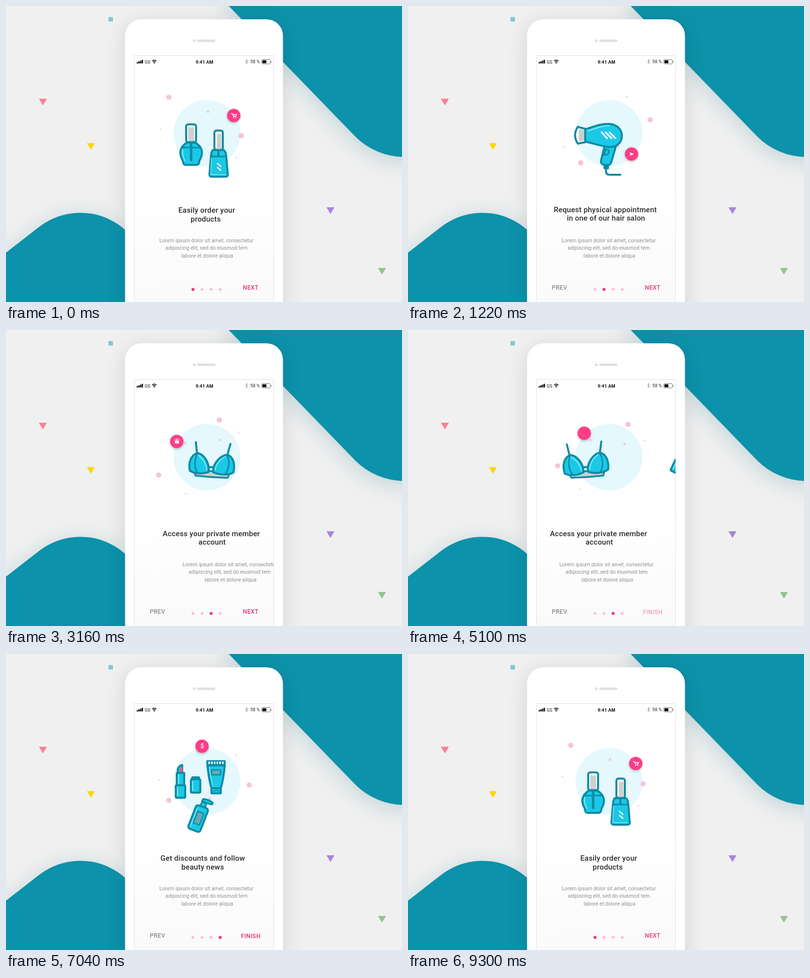
Animation of 800x600 px, one loop 9.74 s. Source, as an HTML page with a canvas:

```html
<!DOCTYPE html>
<html lang="en">
<head>
<meta charset="utf-8">
<title>Beauty app onboarding</title>
<style>
html, body { margin: 0; width: 100%; height: 100%; overflow: hidden; background: #f0f0f0; }
canvas { display: block; width: 800px; height: 600px; }
</style>
</head>
<body>
<canvas id="stage" width="800" height="600"></canvas>
<script>
const LOOP = 9740, SLIDE = 300;
const TEAL = '#0c92aa', LINE = '#0d8ca3', CYAN = '#1ac9e6', PALE = '#8ce8f5', PINK = '#fc3d88', GREY = '#cfcfcf';
const FONT = 'Roboto, sans-serif';
const stage = document.getElementById('stage').getContext('2d');
let c = stage;

// ---------- timing ----------
const starts = [20, 1976, 4559, 7716];
const spans = [1300, 1740, 1740, 1740];
const clamp = v => Math.max(0, Math.min(1, v));
const ramp = (t, a, b) => clamp((t - a) / (b - a));
const ease = p => p < .5 ? 16 * p ** 5 : 1 - 16 * (1 - p) ** 5;

function progress(i, t, delay = 0) {
  const d = delay * spans[i] / 1740;
  return ease(clamp((t - starts[i] - d) / spans[i]));
}

// Sums the eased steps between consecutive values.
const follow = (values, delays, t) => delays.reduce(
  (v, d, i) => v + (values[i + 1] - values[i]) * progress(i, t, d), values[0]);

// Returns how far a part is still to come in (0..1) and how far it has left (0..1).
function travel(scene, t, inDelay, outDelay) {
  if (scene === 0 && t > 6500) return [1 - progress(3, t, inDelay), 0];
  const coming = scene ? 1 - progress(scene - 1, t, inDelay) : 0;
  return [coming, progress(scene, t, outDelay)];
}

// ---------- drawing helpers ----------
function fill(path, color) {
  c.fillStyle = color;
  c.fill(new Path2D(path));
}
function line(path, width = 4, color = LINE) {
  c.strokeStyle = color;
  c.lineWidth = width;
  c.stroke(new Path2D(path));
}
function shape(path, color = CYAN, width = 4) {
  fill(path, color);
  line(path, width);
}
function disc(x, y, r, color) {
  c.fillStyle = color;
  c.beginPath();
  c.arc(x, y, r, 0, Math.PI * 2);
  c.fill();
}
function box(x, y, w, h, r, color, width) {
  c.beginPath();
  c.roundRect(x, y, w, h, r);
  c.fillStyle = color;
  c.fill();
  if (width) {
    c.strokeStyle = LINE;
    c.lineWidth = width;
    c.stroke();
  }
}
function text(str, x, y, font, color, spacing = 0, align = 'center') {
  c.font = font + ' ' + FONT;
  c.letterSpacing = spacing + 'px';
  c.textAlign = align;
  c.fillStyle = color;
  c.fillText(str, x, y);
}

// ---------- illustrations ----------
function roundPolish() {
  shape('M365 277C350 287 349 300 357 313Q358 322 362 322H386Q390 322 391 313C399 300 398 287 383 277Z');
  line('M357 291Q355 301 361 313', 2, PALE);
  line('M355 287H393', 3);
  line('M374 278V312', 5);
  box(364, 240, 20, 36, 4, '#fff', 4);
  box(368, 246, 12, 28, 0, GREY);
}
function tallPolish() {
  shape('M418 292Q415 294 414 305L411 341Q411 346 415 346H444Q448 346 448 341L445 305Q444 294 440 292Z');
  line('M415 309L413.500 342H443', 1.500, PALE);
  line('M415 305H444', 3);
  line('M429 293V304', 4);
  box(421, 252.500, 17, 39, 4, '#fff', 4);
  box(426, 259, 9, 31, 0, GREY);
  line('M427 319L434 325M427 327L434 333', 2.500, '#fff');
}
function dryer() {
  line('M400 329V335Q400 342 407 342H429', 4);
  shape('M397 284L390 313Q389 322 398 322H406Q410 321 412 312L421 281Z');
  shape('M399 291Q407 290 406 296Q405 302 396 302Z', CYAN, 3);
  box(396, 322, 9, 8, 1, LINE, 2);
  shape('M358 250C374 245 388 238 407 239C422 240 432 250 432 263C432 277 423 285 408 286C390 285 375 278 358 275Z');
  line('M363 253C380 248 391 243 407 243', 2, PALE);
  shape('M343 245L358 249V276L343 279Q332 262 343 245Z', '#fff', 4);
  fill('M345 249L356 252V273L345 275Z', GREY);
  line('M391 256L402 268M399 256L411 268M407 256L419 268', 3.500, '#fff');
}
function bra() {
  line('M373 228L376 252M443 230L437 253', 4);
  shape('M370 287L374 296Q406 299 439 299L442 290Q406 284 370 287Z', GREY, 3.500);
  line('M398 278H412', 4);
  const cup = 'M362 286C358 268 365 253 377 250C390 252 402 269 400 288C388 293 371 292 362 286Z';
  const cup2 = 'M450 288C454 270 449 256 437 252C423 254 408 270 409 288C421 294 440 294 450 288Z';
  shape(cup);
  shape(cup2);
  line('M378 254C388 261 395 271 396 284M433 256C421 262 414 274 413 284', 2, PALE);
  line('M377 251C370 264 371 279 377 289M437 253C443 266 441 281 434 291', 3);
}
function lipstick() {
  shape('M347 242V233Q350 226 356 225V242Z', CYAN, 4);
  fill('M351 242V235Q353 230 357 229V242Z', '#f2538f');
  box(345, 241, 15, 26, 1, CYAN, 4);
  line('M348.500 245V264', 2, PALE);
  box(343, 266, 19, 25.500, 2, CYAN, 4);
  line('M346.500 270V287', 2, PALE);
}
function lipstickCap() {
  box(376, 250, 14, 6, 1, CYAN, 4);
  box(373.500, 254, 19, 27, 2, CYAN, 4);
  line('M377 258V277', 2, PALE);
}
function tube() {
  shape('M407 225Q409 251 415 272H434Q440 251 442 225Z');
  box(415, 272, 19, 10.500, 1, CYAN, 4);
  line('M419 279Q424.500 273 430 279', 2);
  box(406.500, 217, 35.500, 9, 0, LINE, 3.500);
  for (let i = 0; i < 6; i++) box(409 + i * 5.500, 218, 3, 5, 0, '#fff');
  line('M411 230Q413 250 418 268', 1.500, PALE);
  box(415.500, 235, 18, 10, 0, '#69a8b3', 2.500);
}
function bottle() {
  c.save();
  c.translate(388, 334);
  c.rotate(.366);
  box(-5, -35, 10, 9, 1, CYAN, 3);
  shape('M-5 -41Q4 -45 16 -41V-37L5 -36H-5Z', CYAN, 3.500);
  box(-13, -26, 26, 51, 5, CYAN, 4);
  line('M-9 -19V20', 1.500, PALE);
  box(-6, -14, 13, 25, 0, '#69a8b3', 2.500);
  c.restore();
}

// ---------- badge icons ----------
function cartIcon() {
  line('M-5 -4H-3L0 2H4L6 -2H-2', 1.500, '#fff');
  disc(-.500, 4.300, 1, '#fff');
  disc(4, 4.300, 1, '#fff');
}
const planeIcon = () => fill('M-4 -3.500L5 0L-4 3.500L-2 0Z', '#fff');
function crownIcon() {
  line('M-3 1L-5.500 -3M-1.500 0L-2.500 -5M0 0V-5.500M1.500 0L2.500 -5M3 1L5.500 -3', 1, '#fff');
  fill('M-4 0H4V5H-4Z', '#fff');
  disc(0, 2.500, 1, PINK);
}
const dollarIcon = () => text('$', .500, 4.300, '500 12px', '#fff');

// Each part: draw, centre x, centre y, in delay, out delay, tilt on leaving.
const scenes = [
  { title: ['Easily order your', 'products'], x: [405.5, 403.5], y: 419, icon: cartIcon,
    parts: [[roundPolish, 374, 281, -60, -120, -35], [tallPolish, 429, 300, 0, 0, 35]] },
  { title: ['Request physical appointment', 'in one of our hair salon'], x: [398.5, 400], y: 417.5, icon: planeIcon,
    parts: [[dryer, 384, 290, 0, -130, -35]] },
  { title: ['Access your private member', 'account'], x: [399, 400.5], y: 417.5, icon: crownIcon,
    parts: [[bra, 406, 264, -51, -151, -42]] },
  { title: ['Get discounts and follow', 'beauty news'], x: [397.5, 397.5], y: 419, icon: dollarIcon,
    parts: [[lipstick, 352, 259, -260, -127, 40], [lipstickCap, 383, 266, -90, 33, 45],
            [tube, 424, 249, 120, 266, 0], [bottle, 388, 327, 0, 97, 0]] }
];
const copy = ['Lorem ipsum dolor sit amet, consectetur', 'adipiscing elit, sed do eiusmod tem', 'labore et dolore aliqua'];

// Offset from the pivot and radius of each drifting dot.
const specks = [[-67, -69, 5.3], [79, 9, 5.3], [12, -40, 2.6], [41, 23.5, 2.4], [-84, -5, 1.5], [68, 54, 1.5]];

// ---------- static backdrop ----------
function shadow(color, blur, y = 0) {
  c.shadowColor = color;
  c.shadowBlur = blur;
  c.shadowOffsetY = y;
}
function triangle(x, y, color) {
  fill(`M${x - 8} ${y - 6.5}H${x + 8}L${x} ${y + 7}Z`, color);
}
function statusBar() {
  for (let i = 0; i < 4; i++) box(264 + i * 3.400, 113.500 - i * 1.500, 2.600, 3 + i * 1.500, .5, '#111');
  text('GS', 280, 116.500, '9px', '#222', 0, 'left');
  line('M295 111.500Q299.500 107.500 304 111.500M296.800 113.500Q299.500 111 302.200 113.500', 1.500, '#111');
  disc(299.5, 115.3, 1.2, '#111');
  text('9:41 AM', 401, 116.500, 'bold 9px', '#111', .2);
  line('M483.500 110.500L488.500 115L486 117.500V108L488.500 110.500L483.500 115', .8, '#888');
  text('58 %', 493.500, 116.300, '9px', '#222', .1, 'left');
  c.beginPath();
  c.roundRect(516.5, 108.5, 17.5, 9, 2);
  c.strokeStyle = '#777';
  c.lineWidth = 1;
  c.stroke();
  box(518, 110, 8, 6, .5, '#111');
  box(535, 111.500, 1.300, 3, .5, '#777');
}
function makeBackdrop() {
  const cv = document.createElement('canvas');
  cv.width = 800;
  cv.height = 600;
  c = cv.getContext('2d');
  c.fillStyle = '#f0f0f0';
  c.fillRect(0, 0, 800, 600);
  shadow('rgba(12,110,130,.22)', 46, 8);
  fill('M450 0L706 265A140 140 0 0 0 805 306H860V-60H450Z', TEAL);
  fill('M-40 531L0 500L64 450A135.800 135.800 0 0 1 286 555V660H-40Z', TEAL);
  shadow('transparent', 0);
  box(207, 22.500, 9, 9, 0, '#82c6d2');
  triangle(74.5, 194.5, '#fb7f95');
  triangle(171.5, 284.5, '#ffd500');
  triangle(655.5, 414.5, '#a882dd');
  triangle(759.5, 537.5, '#90c490');
  shadow('rgba(0,20,30,.13)', 42, 8);
  box(240.500, 27, 319, 640, 33, '#fff');
  shadow('transparent', 0);
  disc(380.300, 70.500, 3, '#e0e0e0');
  box(386, 68, 37, 5, 2.500, '#e0e0e0');
  const g = c.createLinearGradient(0, 370, 0, 600);
  g.addColorStop(0, '#fff');
  g.addColorStop(1, '#f9faf9');
  c.fillStyle = g;
  c.fillRect(260, 101, 281, 499);
  c.strokeStyle = '#e1e1e1';
  c.lineWidth = 1;
  c.strokeRect(259.5, 100.5, 281, 520);
  statusBar();
  disc(406, 258, 67.5, '#e4f8fe');
  c = stage;
  return cv;
}

// ---------- moving layers ----------
function drawSpecks(t) {
  const turn = follow([0, 120, 293, 501, 720], [-20, -99, 16, -131], t) * Math.PI / 180;
  const cos = Math.cos(turn), sin = Math.sin(turn);
  for (const [x, y, r] of specks) disc(396 + x * cos - y * sin, 254 + x * sin + y * cos, r, '#f8c3da');
}

function drawScene(s, t) {
  const { title, x, y, parts } = scenes[s];
  for (const [draw, cx, cy, inDelay, outDelay, lean] of parts) {
    const [a, b] = travel(s, t, inDelay, outDelay);
    if (a > .99 || b > .99) continue;
    c.save();
    c.translate(cx + SLIDE * (a - b), cy);
    c.rotate((a * 38 + b * lean) * Math.PI / 180);
    c.translate(-cx, -cy);
    draw();
    c.restore();
  }
  const [a, b] = travel(s, t, 0, 0);
  title.forEach((str, i) => text(str, x[i] + SLIDE * (a - b), y + i * 17.5, '500 15px', '#2d2d2d', .18));
  const [d, e] = travel(s, t, 135, 122);
  copy.forEach((str, i) => text(str, (i < 2 ? 405 : 406.5) + SLIDE * (d - e), 478.8 + i * 15.6, '10.6px', '#8f8f8f'));
}

// Badge orbit: angle in degrees and radius at each stop.
const angles = [-33.7, 42.7, 208.6, 262, 326.3], radii = [65, 62, 69, 71.7, 65];
function orbit(angle, r) {
  const a = angle * Math.PI / 180;
  return [406 + r * Math.cos(a), 258 + r * Math.sin(a)];
}
function drawBadge(t) {
  const delays = [0, -208, -240, 40];
  const [x, y] = orbit(follow(angles, delays, t), follow(radii, delays, t));
  shadow('rgba(0,0,0,.25)', 5, 2);
  disc(x, y, 13.5, PINK);
  shadow('transparent', 0);
  c.save();
  c.beginPath();
  c.arc(x, y, 13.5, 0, Math.PI * 2);
  c.clip();
  scenes.forEach((scene, i) => {
    const [ix, iy] = orbit(angles[i], radii[i]);
    const alpha = clamp((17 - Math.hypot(x - ix, y - iy)) / 6);
    if (!alpha) return;
    c.save();
    c.globalAlpha = alpha;
    c.translate(ix, iy);
    scene.icon();
    c.restore();
  });
  c.restore();
}

function drawControls(t) {
  const label = (str, x, y, color, alpha) => {
    c.globalAlpha = alpha;
    if (alpha) text(str, x, y, '500 12px', color, .3);
    c.globalAlpha = 1;
  };
  label('PREV', 306, 575.3, '#8a8a8a', ramp(t, 400, 800) - ramp(t, 8450, 8800));
  label('NEXT', 494.3, 575.3, '#ee2f7b', 1 - ramp(t, 4600, 4900) + ramp(t, 8640, 8960));
  label('FINISH', 494.5, 576.3, '#ee2f7b', ramp(t, 4900, 5350) - ramp(t, 8320, 8640));
  const swap = starts.map((s, i) => ramp(t, s + spans[i] / 2 - 50, s + spans[i] / 2 + 160));
  for (let i = 0; i < 4; i++) {
    const x = 377.7 + i * 18.35;
    disc(x, 574.5, 3, '#fac4da');
    c.globalAlpha = clamp(i ? swap[i - 1] - swap[i] : 1 - swap[0] + swap[3]);
    disc(x, 574.5, 3, '#f0347f');
    c.globalAlpha = 1;
  }
}

const backdrop = makeBackdrop();
stage.lineJoin = stage.lineCap = 'round';

function frame(now) {
  const t = now % LOOP;
  c.drawImage(backdrop, 0, 0);
  c.save();
  c.beginPath();
  c.rect(260, 101, 280.5, 499);
  c.clip();
  drawSpecks(t);
  scenes.forEach((_, s) => drawScene(s, t));
  drawBadge(t);
  drawControls(t);
  c.restore();
  requestAnimationFrame(frame);
}
requestAnimationFrame(frame);
</script>
</body>
</html>
```
